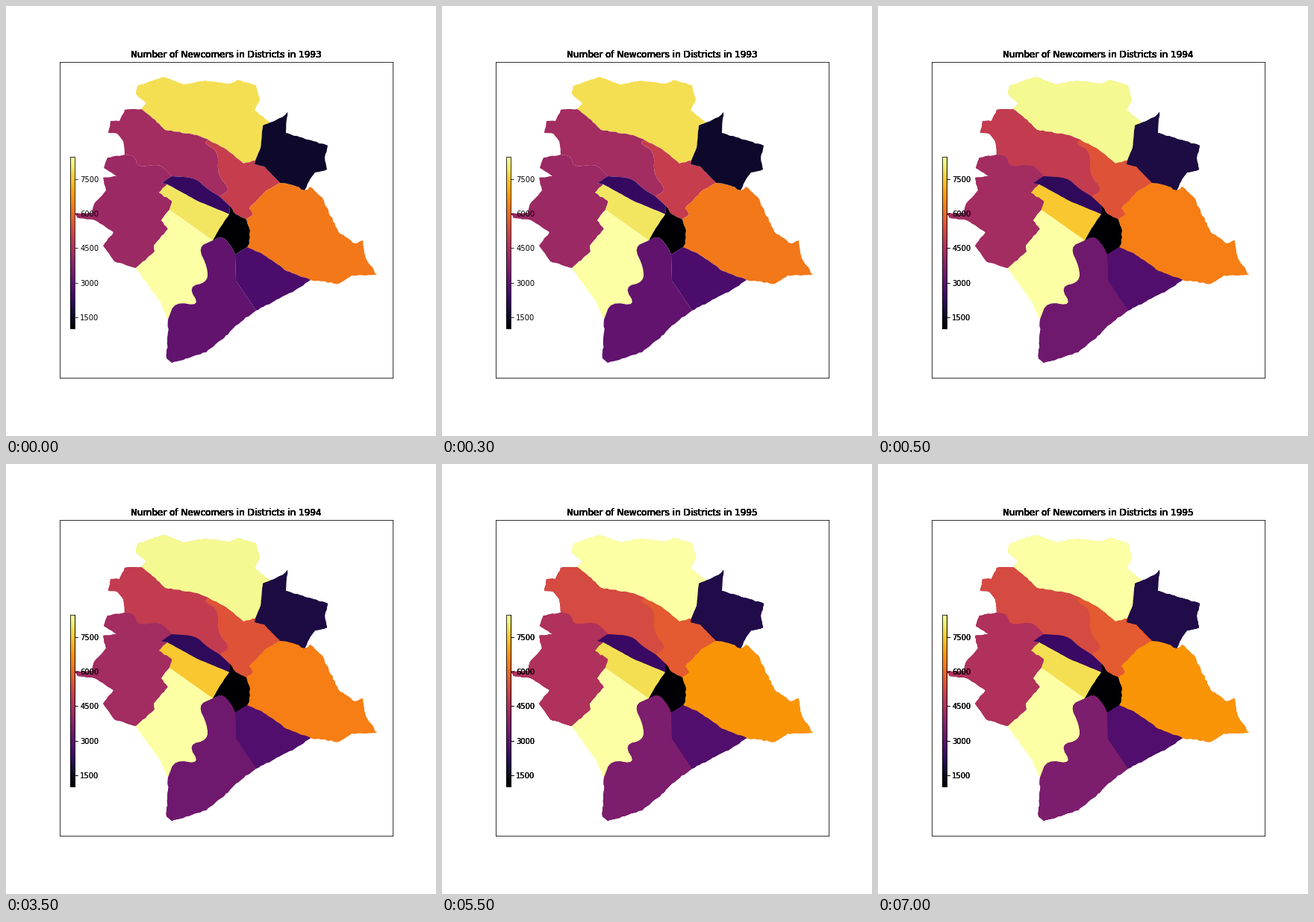
Recreate the animation shown at these times as a matplotlib script. Size 576 by 576 pixels, loop 8000 ms.

```python
import math
import random

import matplotlib.pyplot as plt
from matplotlib.animation import FuncAnimation
from matplotlib.cm import ScalarMappable
from matplotlib.collections import PolyCollection
from matplotlib.colors import Normalize

SIZE = 576
YEARS = (1993, 1994, 1995)
CMAP = plt.get_cmap("inferno")
rng = random.Random(7)

# Points where districts meet: a to h on the outside, i to u inside
JUNCTIONS = dict(
    a=(181, 138), b=(354, 156), c=(400, 247), d=(408, 367), e=(335, 408),
    f=(217, 420), g=(174, 351), h=(159, 199), i=(271, 179), j=(334, 207),
    k=(367, 237), l=(322, 286), m=(300, 268), n=(286, 255), o=(222, 228),
    p=(216, 239), q=(299, 279), r=(219, 273), s=(277, 314), t=(307, 333),
    u=(323, 323))
borders = {}


def lerp(p, q, t):
    return p[0] + (q[0] - p[0]) * t, p[1] + (q[1] - p[1]) * t


def rounded(pts):
    """Cut every corner twice so that the line becomes a soft curve."""
    for _ in range(2):
        cut = [lerp(p, q, t) for p, q in zip(pts, pts[1:]) for t in (.25, .75)]
        pts = [pts[0], *cut, pts[-1]]
    return pts


def ragged(pts, rough, step=4):
    """Shake the line a little every few pixels, keeping its key points."""
    out = [pts[0]]
    for p, q in zip(pts, pts[1:]):
        n = max(1, round(math.dist(p, q) / step))
        for k in range(1, n):
            x, y = lerp(p, q, k / n)
            out.append((x + rng.uniform(-rough, rough),
                        y + rng.uniform(-rough, rough)))
        out.append(q)
    return out


def border(ends, *via, rough=.6, soft=False):
    """Store the line between two junctions in both directions."""
    pts = [JUNCTIONS[ends[0]], *via, JUNCTIONS[ends[1]]]
    pts = rounded(pts) if soft else ragged(pts, rough)
    borders[ends] = pts
    borders[ends[::-1]] = pts[::-1]


def district(corners):
    """Closed shape through the junctions, straight where no border is set."""
    path = []
    for p, q in zip(corners, corners[1:] + corners[0]):
        path += borders.get(p + q, [JUNCTIONS[p], JUNCTIONS[q]])[:-1]
    return path


# Outer borders
border("ab", (188, 131), (174, 118), (176, 107), (211, 95), (238, 105),
       (266, 100), (300, 104), (310, 99), (335, 106), (340, 125), (333, 140))
border("bc", (370, 149), (377, 142), (375, 170), (431, 187), (427, 203),
       (430, 219), (414, 223), (404, 238))
border("cd", (407, 242), (423, 256), (445, 302), (467, 318), (478, 314),
       (482, 338), (497, 360), (463, 361), (446, 372), rough=1)
border("de", (387, 381))
border("ef", (308, 428), (292, 445), (268, 464), (222, 478), (215, 472),
       (217, 437), rough=.8)
border("fg", (207, 397), (190, 374))
border("gh", (145, 342), (130, 321), (144, 303), (119, 287), (96, 284),
       (92, 278), (115, 277), (118, 265), (134, 247), (130, 230), (148, 228),
       (131, 217), (136, 203))
border("ha", (157, 181), (149, 171), (137, 170), (140, 154), (152, 154),
       (159, 139))

# Inner borders
border("ai", (194, 148), (213, 166), (256, 173))
border("ij", (295, 192), (318, 211))
border("bj", (344, 160), (341, 190), rough=.3)
border("jk", (333, 212), (346, 215), rough=.3)
border("ck", (384, 240), rough=.8)
border("kl", (349, 247), (326, 271), (331, 279))
border("lm", (308, 279))
border("in", (265, 184), (285, 195), (283, 226), (301, 246), soft=True)
border("ho", (173, 201), (176, 216), (203, 212), (212, 217), soft=True)
border("on", (254, 230), (268, 244), soft=True)
border("op", (208, 237), rough=.3)
border("pq", (256, 261), rough=.2)
border("pr", (205, 250), (222, 261), rough=1)
border("qs", (286, 298), rough=.2)
border("rg", (208, 287), (217, 299), (198, 321), (199, 329))
border("sf", (257, 323), (270, 350), (270, 370), (244, 376), (260, 402),
       (226, 396), soft=True)
border("st", (290, 308), (302, 322), soft=True)
border("lu", (327, 301), (326, 318), rough=.8)
border("ud", (342, 331), (376, 355))
border("te", (308, 368), rough=0)

# Junctions around each district and its colour level in the three years
LEVELS = {
    "abji": (.915, .98, 1),
    "haino": (.44, .52, .575),
    "ghopr": (.42, .44, .47),
    "ijklmn": (.53, .605, .625),
    "bckj": (.075, .115, .125),
    "cdulk": (.7, .715, .765),
    "onmqp": (.175, .16, .18),
    "pqsr": (.93, .87, .915),
    "rsfg": (1, 1, 1),
    "mlutsq": (0, 0, 0),
    "stef": (.275, .31, .34),
    "tude": (.225, .24, .235),
}


def add_axes(left, top, right, bottom):
    return fig.add_axes([left / SIZE, 1 - bottom / SIZE,
                         (right - left) / SIZE, (bottom - top) / SIZE])


fig = plt.figure(figsize=(8, 8), dpi=72, facecolor="white")
ax = add_axes(72, 74.8, 518.4, 497.8)
ax.set(xlim=(72, 518.4), ylim=(497.8, 74.8), xticks=[], yticks=[])

# Repeated drawing gives the heading its heavy look
titles = [ax.annotate("", (.5, 1), (0, 6), xycoords="axes fraction",
                      textcoords="offset points", ha="center", fontsize=12)
          for _ in range(20)]

# Every year is painted over the years before it
layers = []
shapes = [district(corners) for corners in LEVELS]
scale = ScalarMappable(Normalize(1013, 8475), CMAP)
for year in range(len(YEARS)):
    colors = [CMAP(float(level[year])) for level in LEVELS.values()]
    areas = PolyCollection(shapes, facecolors=colors, edgecolors="none",
                           linewidths=0)
    ax.add_collection(areas, autolim=False)
    cax = add_axes(86.2, 201.9, 92.2, 431.9)
    fig.colorbar(scale, cax=cax, ticks=range(1500, 7501, 1500))
    layers.append((areas, cax))


def draw(i):
    now = 0 if i < 1 else 1 if i < 11 else 2
    for k, layer in enumerate(layers):
        for part in layer:
            part.set_visible(k <= now)
    for title in titles:
        title.set_text(f"Number of Newcomers in Districts in {YEARS[now]}")
    return titles


anim = FuncAnimation(fig, draw, frames=16, interval=500, repeat=True,
                     repeat_delay=0, blit=False)
plt.show()
```
